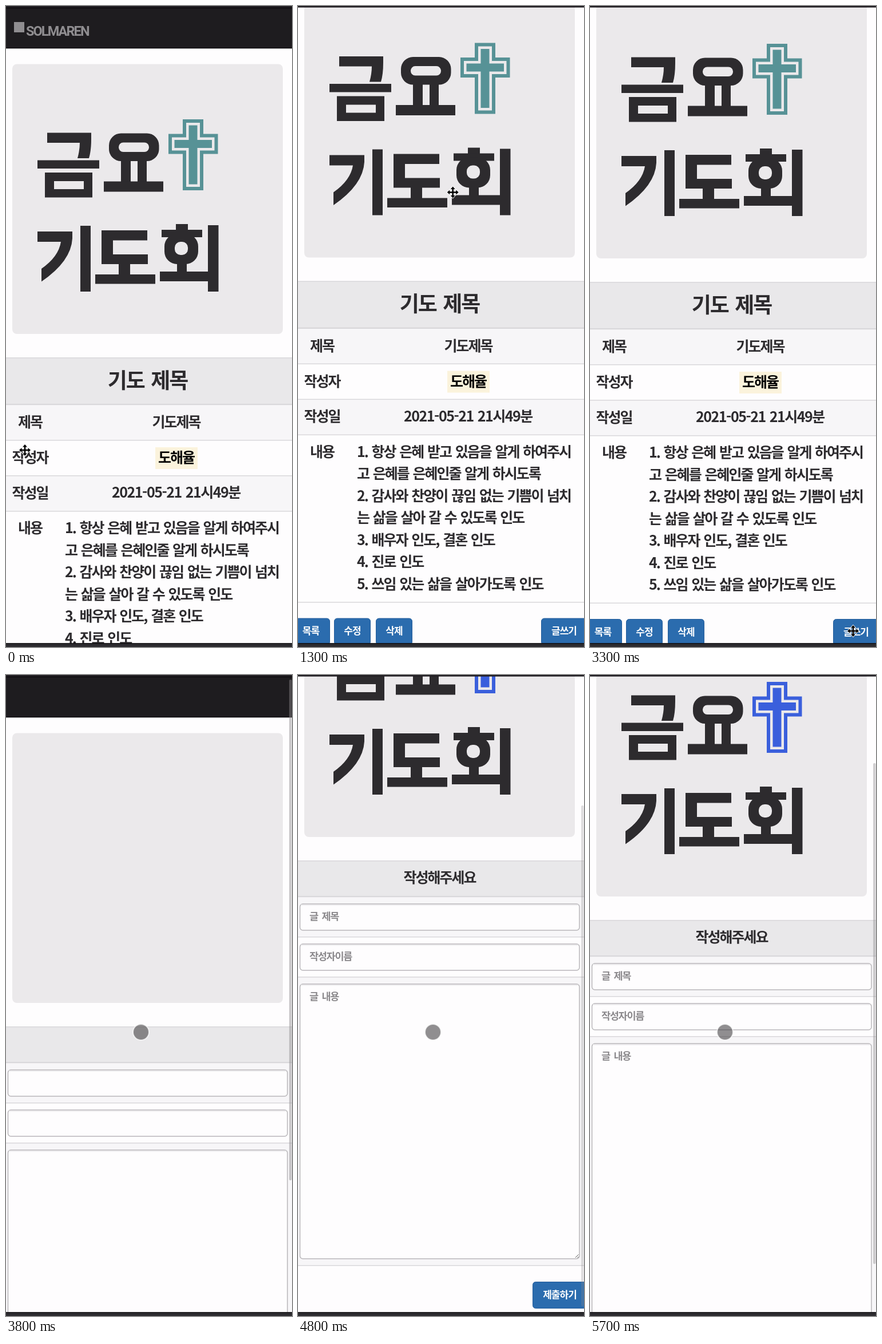
Recreate the animation shown at these times as an HTML page. Size 500x1120 px, loop 5.9 s.

```html
<!DOCTYPE html>
<html lang="ko">
<head>
<meta charset="utf-8">
<title>금요 기도회</title>
<style>
html, body { margin: 0; width: 100%; height: 100%; overflow: hidden; background: #fefdfe; }
svg { display: block; width: 100%; height: 100%; }
text { font-family: "Noto Sans CJK KR", "Noto Sans KR", "Noto Sans CJK JP", sans-serif; font-weight: 900; white-space: pre; }
</style>
</head>
<body>
<svg id="stage" viewBox="0 0 500 1120"></svg>
<script>
const INK = '#2d2b2e', PAPER = '#fefdfe', CARD = '#ebe9eb', STRIPE = '#f7f6f8', LINE = '#d9d8db';
const LOOP = 5900;

const rect = (x, y, w, h, fill, more = '') =>
  `<rect x="${x}" y="${y}" width="${w}" height="${h}" fill="${fill}" ${more}/>`;
const path = (d, fill, more = '') => `<path d="${d}" fill="${fill}" ${more}/>`;
const box = (x1, y1, x2, y2) => `M${x1} ${y1}H${x2}V${y2}H${x1}Z`;
const rule = (y, h = 1.5) => rect(0, y, 500, h, LINE);

// y is the visual middle of the line
function text(str, x, y, { size = 25, gap = -2, word = 1.7, fill = INK, anchor = 'middle' } = {}) {
  return `<text x="${x}" y="${y + size * 0.375}" font-size="${size}" fill="${fill}" ` +
    `text-anchor="${anchor}" style="letter-spacing:${gap}px;word-spacing:${word}px">${str}</text>`;
}

function button(x1, x2, y, label, mid) {
  return rect(x1 + .5, y, x2 - x1 - 1, 46, '#2b6cae', 'rx="5" stroke="#245d9b"') +
    text(label, mid, y + 22, { size: 17, gap: -1, fill: '#fff' });
}

function cross(inset, fill) {
  const a = 284 + inset, b = 309 + inset, c = 345 - inset, d = 370.5 - inset;
  const top = 198 + inset, up = 223.5 + inset, low = 258.5 - inset, end = 322 - inset;
  return path(`M${b} ${top}H${c}V${up}H${d}V${low}H${c}V${end}H${b}V${low}H${a}V${up}H${b}Z`, fill);
}

function ring(x1, y1, x2, y2, r) {
  return `M${x1 + r} ${y1}H${x2 - r}A${r} ${r} 0 0 1 ${x2} ${y1 + r}V${y2 - r}A${r} ${r} 0 0 1 ${x2 - r} ${y2}` +
    `H${x1 + r}A${r} ${r} 0 0 1 ${x1} ${y2 - r}V${y1 + r}A${r} ${r} 0 0 1 ${x1 + r} ${y1}Z`;
}

// large lettering, one entry per syllable
const syllables = [
  ['M72 221.5H149V232Q149 253 145 266H125Q129 252 129 239H72Z' + box(55, 269.5, 163, 284),
    box(68, 291, 151, 334.5) + box(84, 306, 136, 320)],
  [ring(180, 222.5, 267.5, 271, 21) + ring(197, 238.5, 250, 255, 8),
    box(201, 269, 218, 308), box(230, 269, 246, 308), box(171, 306.5, 275, 324.5)],
  ['M55 394H116V406Q114 446 62 481.5V459Q92 438 96 412H55Z', box(130, 384, 148, 499)],
  ['M167 392H247V409.5H187V434H248V451H167Z', box(197, 450, 217, 470), box(156, 469, 261, 485.5)],
  [box(297, 381, 318, 393), box(272, 391, 343, 404),
    ring(277, 398, 336, 451, 22) + ring(295, 412, 318, 435, 10),
    box(299, 449, 316, 465), box(269, 464, 356, 481), box(353, 383, 371.5, 499)],
];
const lettering = syllables.flat().map(d => path(d, INK, 'fill-rule="evenodd"')).join('');

const banner = rect(0, 0, 500, 74, '#1e1c1f') + rect(0, 2.5, 500, 1.5, '#0a090b') +
  rect(0, 73, 500, 1.3, '#0a090b') + rect(11, 101.5, 473, 471.5, CARD, 'rx="8"');

const title = hue => `<g role="img" aria-label="금요 기도회">${lettering}` +
  cross(0, hue) + cross(6, CARD) + cross(10.5, hue) + '</g>';

const brand = rect(14, 28, 18, 18, '#8f8d90') +
  `<text x="35" y="52" font-size="23.5" fill="#8f8d90" style="font-family:Roboto,sans-serif;font-weight:700;letter-spacing:-1.9px">SOLMAREN</text>`;

const prayers = [
  '1. 항상 은혜 받고 있음을 알게 하여주시',
  '고 은혜를 은혜인줄 알게 하시도록',
  '2. 감사와 찬양이 끊임 없는 기쁨이 넘치',
  '는 삶을 살아 갈 수 있도록 인도',
  '3. 배우자 인도, 결혼 인도',
  '4. 진로 인도',
  '5. 쓰임 있는 삶을 살아가도록 인도',
];

const readPage = banner + brand + title('#579296') +
  rect(0, 614, 500, 83, '#e9e8ea') + rule(614) + rule(695, 2.5) +
  text('기도 제목', 247.5, 654, { size: 37, word: 3 }) +
  rect(0, 697.5, 500, 61, STRIPE) + rect(0, 821, 500, 61, STRIPE) +
  [758, 820, 882, 1174.5].map(y => rule(y)).join('') +
  ['제목', '작성자', '작성일', '내용'].map((s, i) => text(s, 42, 727 + i * 61.6)).join('') +
  text('기도제목', 297.5, 727) +
  rect(261, 771, 74, 38, '#fbf3dc') + text('도해율', 297.5, 789, { fill: '#000' }) +
  text('2021-05-21 21시49분', 297.5, 850, { gap: -1.5 }) +
  prayers.map((s, i) => text(s, 103, 912 + i * 38.5, { anchor: 'start' })).join('') +
  button(-10, 56, 1203.5, '목록', 22.5) + button(63, 127, 1203.5, '수정', 95) +
  button(136, 200, 1203.5, '삭제', 168) + button(425, 510, 1203.5, '글쓰기', 465);

const field = (y, h) => rect(3.5, y, 488.5, h, PAPER, 'rx="5" stroke="#b9b7ba" stroke-width="1.5"') +
  rect(5, y + 1, 485, 2, '#efeef0');
const hint = (s, y) => text(s, 20, y, { size: 17.5, gap: -1.3, word: 3, fill: '#8b898c', anchor: 'start' });

const writePage = banner +
  rect(0, 614, 500, 64, '#e9e8ea') + rule(614) + rule(676, 2.5) +
  rect(0, 678.5, 500, 69, STRIPE) + rect(0, 818, 500, 503, STRIPE) +
  [747, 817, 1321].map(y => rule(y)).join('') +
  field(690, 46) + field(760, 46) + field(830, 480) +
  path('M485 1308L490.5 1302.5M488.5 1308.5L490.5 1306.5', 'none', 'stroke="#555"') +
  '<g id="words">' + title('#3a5fdc') + text('작성해주세요', 247.5, 644) +
  hint('글 제목', 711.5) + hint('작성자이름', 781.5) + hint('글 내용', 851.5) +
  button(410, 510, 1350.5, '제출하기', 457.5) + '</g>';

const arrows = 'M0-10L4-5.5H1.3V-1.3H5.5V-4L10 0L5.5 4V1.3H1.3V5.5H4L0 10L-4 5.5H-1.3V1.3H-5.5V4L-10 0L-5.5-4V-1.3H-1.3V-5.5H-4Z';

document.getElementById('stage').innerHTML =
  rect(0, 0, 500, 1120, PAPER) +
  `<g id="read">${readPage}</g><g id="write">${writePage}</g>` +
  rect(495, 8, 4.5, 875, '#8c8a8d', 'id="bar" rx="2"') +
  rect(0, 0, 500, 2.6, '#221f24') +
  rect(0, 1113.5, 500, 7, '#2d2c30') + rect(0, 1113.2, 500, 1.3, '#0c0a0d') +
  path(arrows, '#000', 'id="mouse" stroke="#fff" stroke-width="1.6" paint-order="stroke"') +
  '<circle id="touch" cx="236" cy="624" r="14" fill="#3c3a3c" fill-opacity=".57" stroke="#fff" stroke-opacity=".75" stroke-width="2"/>';

const el = id => document.getElementById(id);
const [read, write, words, bar, mouse, touch] = ['read', 'write', 'words', 'bar', 'mouse', 'touch'].map(el);
const show = (node, on) => node.setAttribute('display', on ? 'inline' : 'none');

// rows of [time, value, ...], eased between neighbours
function track(keys, t) {
  const i = keys.findIndex(k => k[0] > t);
  if (i < 0) return keys[keys.length - 1].slice(1);
  const a = keys[i - 1], b = keys[i];
  const p = (t - a[0]) / (b[0] - a[0]), e = p * p * (3 - 2 * p);
  return a.slice(1).map((v, n) => v + (b[n + 1] - v) * e);
}

const readScroll = [[0, 0], [300, 0], [700, 149], [800, 149], [900, 146], [1400, 132]];
const writeScroll = [[0, 0], [4000, 0], [4600, 290], [4800, 290], [5200, 56], [5300, 40], [5700, 186]];
const pointer = [[0, 33, 776], [100, 292, 776], [300, 292, 776], [800, 180, 781], [1000, 180, 781],
  [1500, 320, 78], [1700, 20, 600], [1900, 300, 1095], [2000, 476, 1090], [2100, 416, 674],
  [2500, 11, 1089], [2600, 11, 1089], [2700, 32, 1090], [3200, 460, 1092]];
const barFade = [[0, 0], [300, 0], [400, .45], [900, .45], [1300, 0], [3500, 0], [3600, .45],
  [4600, .45], [4800, .28], [4900, .4], [5900, .4]];

function draw(now) {
  const t = Math.floor(now % LOOP / 100) * 100;
  const writing = t >= 3600;
  const [scroll] = track(writing ? writeScroll : readScroll, t);
  show(read, !writing);
  show(write, writing);
  show(words, t >= 4000);
  show(mouse, !writing);
  show(touch, writing);
  (writing ? write : read).setAttribute('transform', `translate(0 ${-scroll})`);
  mouse.setAttribute('transform', `translate(${track(pointer, t)})`);
  bar.setAttribute('y', 8 + Math.min(scroll * .785, 220));
  bar.setAttribute('height', writing ? 875 : 978);
  bar.setAttribute('opacity', track(barFade, t)[0]);
}

let start;
function tick(now) {
  start ??= now;
  draw(now - start);
  requestAnimationFrame(tick);
}
draw(0);
requestAnimationFrame(tick);
</script>
</body>
</html>
```
